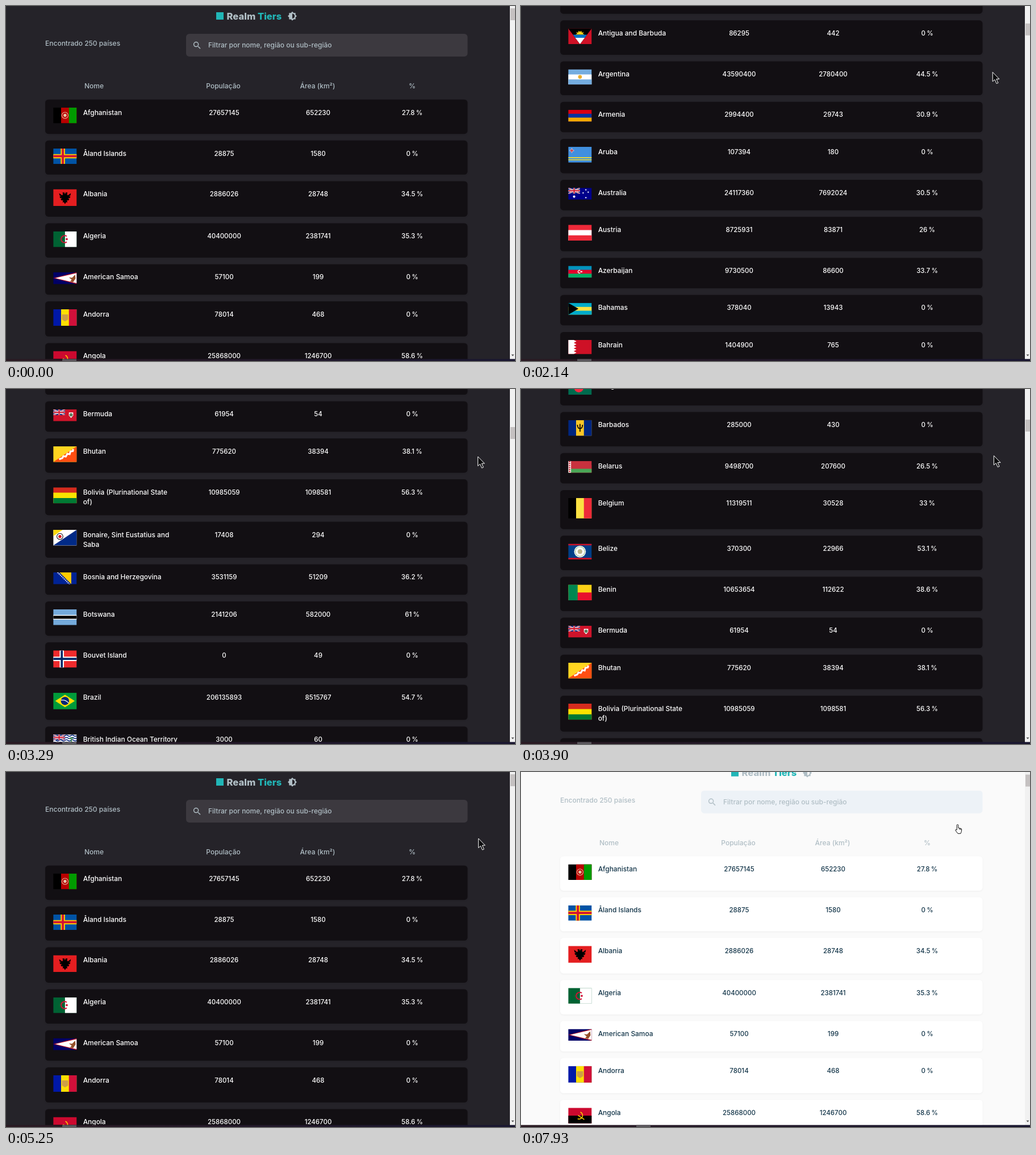
An HTML page for the animation above (8000 ms loop, 896 px wide and 625 px high).

```html
<!DOCTYPE html>
<html lang="pt">
<head>
<meta charset="utf-8">
<title>Realm Tiers</title>
<style>
  html, body { margin: 0; width: 100%; height: 100%; overflow: hidden; }
  body { --bg: #252329; --field: #3c393f; --card: #120f13; --text: #fff; --soft: #b0bec5; background: var(--bg); }
  body.light { --bg: #fafafa; --field: #edf2f7; --card: #fff; --text: #133549; }
  #stage { display: block; width: 896px; height: 625px; background: var(--bg); font: 500 12px Inter, "Open Sans", sans-serif; }
  .soft { fill: var(--soft); }
  .mid { text-anchor: middle; }
  .row > rect { fill: var(--card); filter: drop-shadow(0 1.4px 1.4px #0000000d); }
  .row text { fill: var(--text); font-size: 11.9px; }
  .row .mid { font-size: 11.5px; word-spacing: -.8px; }
  .title { font-size: 16.6px; font-weight: 800; }
</style>
</head>
<body>
<svg id="stage" viewBox="0 0 896 625">
  <g id="page">
    <rect x="370" y="11" width="13" height="13" fill="#21b6b7"/>
    <text class="soft title" x="388.5" y="23.5">Realm <tspan fill="#21b6b7">Tiers</tspan></text>
    <path class="soft" transform="translate(495.5 9.3) scale(.707)" d="M20 15.31L23.31 12 20 8.69V4h-4.69L12 .69 8.69 4H4v4.69L.69 12 4 15.31V20h4.69L12 23.31 15.31 20H20zM12 18V6c3.31 0 6 2.69 6 6s-2.69 6-6 6z"/>
    <text class="soft" x="69" y="70">Encontrado 250 países</text>
    <rect x="317" y="49" width="495.5" height="40" rx="5.6" fill="var(--field)"/>
    <path d="M338.2 71.2l3.8 3.8M338.6 67.6a4 4 0 1 1-8 0a4 4 0 0 1 8 0z" fill="none" stroke="var(--soft)" stroke-width="1.5"/>
    <text class="soft" x="356" y="73">Filtrar por nome, região ou sub-região</text>
    <text class="soft" x="138" y="145">Nome</text>
    <text class="soft mid" x="382.5" y="145">População</text>
    <text class="soft mid" x="548.5" y="145">Área (km²)</text>
    <text class="soft mid" x="715" y="145">%</text>
  </g>
  <rect x="887" width="9" height="622" fill="#f1f1f1"/>
  <rect id="thumb" x="888" width="8" height="21" fill="#c5c1c1"/>
  <path d="M889.5 613.5h5l-2.5 3z" fill="#505050"/>
  <linearGradient id="dusk"><stop stop-color="#2a1a22"/><stop offset="1" stop-color="#191630"/></linearGradient>
  <rect y="621.5" width="896" height="3.5" fill="url(#dusk)"/>
  <rect id="task" y="621.5" width="25" height="3.5" fill="#5a565c"/>
  <g id="cursor" stroke-linejoin="round">
    <path id="arrow" d="M.7 1v16.5l3.8-3.4 3.1 7 2.8-1.2-3-6.8h5z" fill="#0b0b0d" stroke="#fff"/>
    <path id="hand" d="M3.2 10V1.8a1.3 1.3 0 0 1 2.6 0V6.5l4.4.9q1.6.4 1.5 2l-.6 4-1.2 3H5L.8 10.8q-.4-2.4 2.4-.8zM8 7v2.5M10 7.5V10" fill="#fff" stroke="#111"/>
  </g>
</svg>
<script>
const $ = id => document.getElementById(id);

// Flag helpers: every flag is 60 units wide.
const fill = (d, c) => `<path d="${d}" fill="${c}"/>`;
const line = (d, c, w, dash = '') => `<path d="${d}" fill="none" stroke="${c}" stroke-width="${w}" stroke-dasharray="${dash}"/>`;
const dot = (x, y, r, c) => `<circle cx="${x}" cy="${y}" r="${r}" fill="${c}"/>`;
const bg = c => fill('M0 0H60V60H0z', c);
const cols = (...cs) => cs.map((c, i) => fill(`M${i * 60 / cs.length} 0H60V60H${i * 60 / cs.length}z`, c)).join('');
const bars = (h, ...cs) => cs.map((c, i) => fill(`M0 ${i * h / cs.length}H60V${h}H0z`, c)).join('');
const cross = (x, y, c1, c2) => [[c1, 11], [c2, 5.3]].map(([c, w]) => line(`M0 ${y}H60M${x} 0V60`, c, w)).join('');
const moon = (x, y, r, c, w) => line(`M${x + r / 2} ${y - r * .8}A${r} ${r} 0 1 0 ${x + r / 2} ${y + r * .8}`, c, w) + dot(x + r / 2, y, r * .3, c);
const jack = '<svg width="30" height="15">' + fill('M0 0H30V15H0z', '#00247d') +
  line('M0 0L30 15M30 0L0 15', '#fff', 3.2) + line('M0 0L30 15M30 0L0 15', '#cf142b', 1.2) +
  line('M0 7.5H30M15 0V15', '#fff', 5) + line('M0 7.5H30M15 0V15', '#cf142b', 3) + '</svg>';
const shield = fill('M40 8h11v8l-5.5 6-5.5-6z', '#fff');

// name, population, area, percent, flag height, flag
const countries = [
  ['Afghanistan', '27657145', '652230', '27.8', 40, cols('#000', '#b90000', '#009b00') + line('M22 20a8 8 0 1 1 16 0a8 8 0 1 1-16 0', '#e6c3a5', 1.5) + dot(30, 20, 4, '#e6c3a5')],
  ['Åland Islands', '28875', '1580', '0', 39.2, bg('#0053a5') + cross(24.5, 19.6, '#ffce00', '#d21034')],
  ['Albania', '2886026', '28748', '34.5', 42.9, bg('#e41e20') + fill('M30 13l2-5 5 1-2 3 2 4 8-6-1 6-4 2 4 1-2 4-4 0 3 3-3 3-3-1 1 6-3-1-3 5-3-5-3 1 1-6-3 1-3-3 3-3-4 0-2-4 4-1-4-2-1-6 8 6 2-4-2-3 5-1z', '#000')],
  ['Algeria', '40400000', '2381741', '35.3', 40, cols('#006233', '#fff') + moon(30, 20, 9, '#d21034', 3)],
  ['American Samoa', '57100', '199', '0', 30, bg('#006') + fill('M0 15L60 0V30z', '#bd1021') + fill('M5 15L60 2V28z', '#fff') + fill('M40 13l8 1 8-8 1 10-6 9-8-1 4-5z', '#96502a')],
  ['Andorra', '78014', '468', '0', 42, cols('#0018a8', '#fedf00', '#d0103a') + fill('M22 13h16v13l-8 5-8-5z', '#cf9f45')],
  ['Angola', '25868000', '1246700', '58.6', 40, bars(40, '#cc092f', '#000') + line('M31 11A9 9 0 1 1 24 28M25 19L41 30', '#ffcb00', 2.3)],
  ['Anguilla', '13452', '91', '0', 30, bg('#00247d') + jack + shield + dot(45.5, 13, 3, '#f0a030')],
  ['Antarctica', '1000', '14000000', '0', 40, bg('#3a7dce') + fill('M12 11l8 5 5-8 10-3 9 4 4 9-2 9-7 4-6 5-4-4-9 2-5-8-5-4z', '#fff')],
  ['Antigua and Barbuda', '86295', '442', '0', 40, bg('#ce1126') + fill('M0 0H60L30 40z', '#000') + fill('M18 16l5-3-3-4 5 2 2-5 3 3 3-3 2 5 5-2-3 4 5 3z', '#fcd116') + fill('M12 16H48L42 24H18z', '#0072c6') + fill('M18 24H42L30 40z', '#fff')],
  ['Argentina', '43590400', '2780400', '44.5', 38.6, bars(38.6, '#74acdf', '#fff', '#74acdf') + dot(30, 19.3, 4.8, '#e8ad2e')],
  ['Armenia', '2994400', '29743', '30.9', 30, bars(30, '#d90012', '#0033a0', '#f2a800')],
  ['Aruba', '107394', '180', '0', 40, bg('#418fde') + line('M0 27.8H60M0 33H60', '#fbe122', 2.4) + line('M9 4V15M3.5 9.5H14.5', '#fff', 3) + line('M9 5V14M4.5 9.5H13.5', '#d22630', 2)],
  ['Australia', '24117360', '7692024', '30.5', 30, bg('#00008b') + jack + dot(15, 22.5, 3, '#fff') + [[45, 5], [38, 13], [51, 11], [45, 25]].map(([x, y]) => dot(x, y, 1.7, '#fff')).join('')],
  ['Austria', '8725931', '83871', '26', 40, bars(40, '#ed2939', '#fff', '#ed2939')],
  ['Azerbaijan', '9730500', '86600', '33.7', 30, bars(30, '#0092bc', '#e4002b', '#00ae65') + moon(29, 15, 3.6, '#fff', 1.8) + dot(34, 15, 2, '#fff')],
  ['Bahamas', '378040', '13943', '0', 30, bars(30, '#00abc9', '#fae042', '#00abc9') + fill('M0 0L26 15L0 30z', '#000')],
  ['Bahrain', '1404900', '765', '0', 36, bg('#ce1126') + fill('M0 0H14' + 'l7 3.6-7 3.6'.repeat(5) + 'H0z', '#fff')],
  ['Bangladesh', '161006790', '147570', '32.1', 36, bg('#006a4e') + dot(27, 18, 12, '#f42a41')],
  ['Barbados', '285000', '430', '0', 40, cols('#00267f', '#ffc726', '#00267f') + line('M30 10V30M23.5 12C24 25 36 25 36.5 12', '#000', 2.5)],
  ['Belarus', '9498700', '207600', '26.5', 30, bars(30, '#c8313e', '#c8313e', '#4aa657') + fill('M0 0H7V30H0z', '#fff') + line('M3.5 0V30', '#c8313e', 4, '3 2')],
  ['Belgium', '11319511', '30528', '33', 52, cols('#000', '#fae042', '#ed2939')],
  ['Belize', '370300', '22966', '53.1', 40, bg('#003f87') + fill('M0 0H60V4H0zM0 36H60V40H0z', '#ce1126') + dot(30, 20, 15, '#fff') + line('M18 20a12 12 0 1 1 24 0a12 12 0 1 1-24 0', '#5a9a4a', 1.5, '2 1') + dot(30, 20, 6, '#b9b58a')],
  ['Benin', '10653654', '112622', '38.6', 40, bars(40, '#fcd116', '#e8112d') + fill('M0 0H24V40H0z', '#008751')],
  ['Bermuda', '61954', '54', '0', 30, bg('#cf142b') + jack + shield + dot(45.5, 14, 4.2, '#5d7c5c')],
  ['Bhutan', '775620', '38394', '38.1', 40, bg('#ffd520') + fill('M60 0V40H0z', '#ff4e12') + line('M15 33l8-3 3-5 6 1 4-7 6 1 2-7 6-1 1-5', '#fff', 4.6)],
  ['Bolivia (Plurinational State|of)', '10985059', '1098581', '56.3', 40.9, bars(40.9, '#d52b1e', '#f9e300', '#007934')],
  ['Bonaire, Sint Eustatius and|Saba', '17408', '294', '0', 40, bg('#fff') + fill('M60 0V40H0z', '#012a87') + fill('M0 0H24L0 16z', '#f9d90f') + dot(17, 17, 8.5, '#000') + dot(17, 17, 7, '#fff') + dot(17, 17, 4, '#dc171d')],
  ['Bosnia and Herzegovina', '3531159', '51209', '36.2', 30, bg('#002395') + fill('M16 0H46V30z', '#fecb00') + line('M11 0L43 32', '#fff', 2.6, '2.6 2')],
  ['Botswana', '2141206', '582000', '61', 40, bg('#75aadb') + fill('M0 14H60V26H0z', '#fff') + fill('M0 16.2H60V23.8H0z', '#000')],
  ['Bouvet Island', '0', '49', '0', 43.6, bg('#ef2b2d') + cross(21.8, 21.8, '#fff', '#002868')],
  ['Brazil', '206135893', '8515767', '54.7', 42, bg('#009b3a') + fill('M30 5L55 21L30 37L5 21z', '#fedf00') + dot(30, 21, 10.5, '#002776') + line('M20 19Q31 17 39 26', '#fff', 1.8)],
  ['British Indian Ocean Territory', '3000', '60', '0', 30, bg('#fff') + [3, 9, 15, 21, 27].map(y => line(`M0 ${y}` + 'q3.75-3 7.5 0t7.5 0'.repeat(4), '#00247d', 2.2)).join('') + jack + line('M46 10V24M41 11Q46 6 51 11', '#3c8a4a', 2.5)],
];

let rowTop = 164.7, html = '';
const rows = countries.map(([name, pop, area, pct, fh, flag]) => {
  const y = rowTop, lines = name.split('|');
  const imgH = fh * .6883, h = lines[1] ? 63.2 : imgH + 33;
  const cell = (x, s) => `<text class="mid" x="${x}" y="${y + 26.8}">${s}</text>`;
  html += `<g class="row"><rect x="69" y="${y}" width="743.5" height="${h}" rx="5.6"/>
    <svg x="83.2" y="${y + 14.1}" width="41.3" height="${imgH}" viewBox="0 0 60 ${fh}" preserveAspectRatio="none">${flag}</svg>` +
    lines.map((s, i) => `<text x="135.7" y="${y + 26.8 + i * 17.5}">${s}</text>`).join('') +
    cell(384, pop) + cell(549.5, area) + cell(715, pct + ' %') + '</g>';
  rowTop += h + 11.6;
  return { y, h };
});
$('page').insertAdjacentHTML('beforeend', html);
const rowEls = document.querySelectorAll('.row');

const scrollKeys = [[940, 0], [1620, 282.7], [1750, 282.7], [2140, 777.6], [2280, 777.6], [2680, 1272.6], [2840, 1272.6],
  [3290, 1830.6], [3430, 1838], [3560, 1838], [4430, 777.6], [4550, 777.6], [5040, 0], [7800, 0], [7930, 16.3]];
const cursorKeys = [[190, 640, 600], [600, 800, 330], [800, 882, 88], [940, 831, 115], [1620, 830, 114], [2680, 829, 117],
  [3290, 830, 118], [4430, 833, 115], [5250, 831, 116], [5330, 831, 116], [6190, 503, 13], [6280, 503, 13], [6460, 501, 7], [7340, 501, 7], [7780, 764, 92]];

// Value of a keyed track at time t, with softened ends.
function at(keys, t, i = 1) {
  const n = keys.findIndex(k => k[0] > t);
  if (n < 0) return keys.at(-1)[i];
  if (n === 0) return keys[0][i];
  const a = keys[n - 1], b = keys[n], k = (t - a[0]) / (b[0] - a[0]);
  return a[i] + (b[i] - a[i]) * (k + k * k * (3 - 2 * k)) / 2;
}

const start = performance.now();
function draw() {
  const t = (performance.now() - start) % 8000, s = at(scrollKeys, t);
  const x = at(cursorKeys, t), y = at(cursorKeys, t, 2);
  document.body.classList.toggle('light', t >= 6850);
  $('page').setAttribute('transform', `translate(0 ${-s})`);
  $('thumb').setAttribute('y', 4 + s * .0344);
  $('task').setAttribute('x', t < 6400 ? 99 : 203);
  let over = t >= 6100;
  rows.forEach((r, i) => {
    const hit = t >= 190 && x > 69 && x < 812 && y + s > r.y && y + s < r.y + r.h;
    over ||= hit;
    rowEls[i].setAttribute('transform', `translate(0 ${hit ? -2.8 : 0})`);
  });
  $('cursor').setAttribute('transform', `translate(${x} ${y})`);
  $('cursor').style.display = t < 190 ? 'none' : '';
  $('arrow').style.display = over ? 'none' : '';
  $('hand').style.display = over ? '' : 'none';
  requestAnimationFrame(draw);
}
draw();
</script>
</body>
</html>
```
